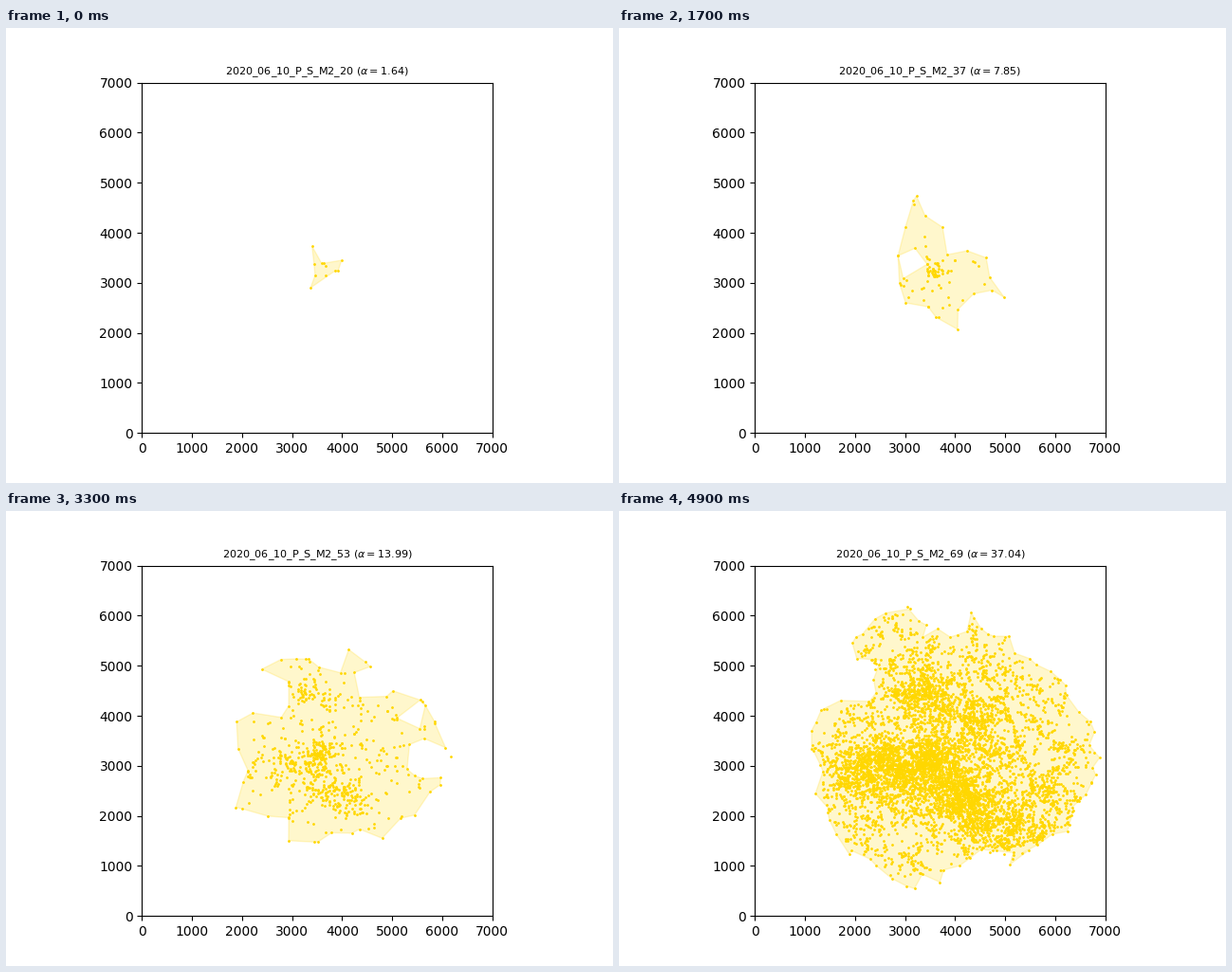
Recreate the animation shown at these times as a matplotlib script. Size 640 by 480 pixels, loop 5 s.

```python
import matplotlib.pyplot as plt
import numpy as np
from matplotlib.animation import FuncAnimation
from matplotlib.collections import LineCollection
from matplotlib.patches import PathPatch
from matplotlib.path import Path
from matplotlib.tri import Triangulation

FRAMES, INTERVAL = 50, 100
FIRST_INDEX = 20
UNIT = 10                      # shapes are written in tens of axis units
CENTRE = np.array([385, 325])
RIM_SPACING = 26
LONGEST_EDGE = 600
CHAIN = np.arange(5)
LOOSE_SHARE = 0.55
rng = np.random.default_rng(7)

# Corner points of the colony; older stages reuse a shape at a larger scale.
SEEDLING = [(340, 373), (344, 337), (346, 315), (337, 290), (386, 324),
            (392, 324), (399, 345), (363, 339), (359, 339)]
SPROUT = [(340, 434), (375, 411), (339, 393), (348, 347), (365, 339),
          (399, 345), (424, 364), (462, 350), (469, 311), (437, 278),
          (388, 301), (346, 315), (337, 266), (346, 252), (388, 256),
          (362, 231), (306, 272), (289, 299), (286, 354), (302, 305),
          (346, 315), (344, 337), (320, 369), (339, 393)]
BRANCHED = [(314, 498), (356, 483), (375, 443), (431, 421), (386, 423),
            (375, 411), (384, 356), (424, 364), (437, 415), (490, 410),
            (522, 341), (504, 338), (498, 271), (439, 231), (405, 207),
            (361, 231), (346, 252), (301, 207), (301, 260), (259, 281),
            (253, 311), (286, 354), (301, 412)]
MATURE = [(311, 591), (340, 536), (390, 536), (428, 580), (458, 542),
          (534, 497), (589, 459), (623, 400), (661, 317), (636, 250),
          (575, 178), (498, 123), (426, 135), (371, 91), (310, 84),
          (244, 133), (183, 178), (145, 252), (138, 366), (191, 421),
          (255, 435), (261, 487), (212, 525), (253, 569)]

# frame, shape, scale, rim roughness, number of points, alpha
STAGES = [(0, SEEDLING, 1, 0, 11, 1.64),
          (12, SPROUT, 1, 0, 60, 7.09),
          (22, BRANCHED, 1, 0, 190, 8.61),
          (27, BRANCHED, 1.09, 4, 420, 11.68),
          (38, MATURE, 0.84, 8, 1350, 15.91),
          (44, MATURE, 1, 4, 3100, 16.74),
          (49, MATURE, 1.1, 12, 6300, 37.04)]
STAGE_FRAMES, _, _, _, TOTALS, ALPHAS = zip(*STAGES)

# x, y and the stage in which a dense spot appears
SPOTS = np.array([(355, 315, 0), (310, 293, 1), (400, 240, 2), (335, 440, 3),
                  (440, 220, 4), (240, 300, 4), (190, 275, 5), (505, 165, 5),
                  (440, 385, 5), (575, 230, 6)])


def outline(shape, scale, roughness):
    """Closed path; a rough rim gets jittered points along its edges."""
    corners = CENTRE + scale * (np.array(shape) - CENTRE)
    rim = []
    for a, b in zip(corners, np.roll(corners, -1, axis=0)):
        pieces = max(1, round(np.hypot(*(b - a)) / RIM_SPACING))
        steps = np.arange(pieces if roughness else 1)[:, None] / pieces
        edge = a + steps * (b - a)
        edge[1:] += rng.normal(0, roughness, edge[1:].shape)
        rim.append(edge)
    rim.append(corners[:1])
    return Path(UNIT * np.vstack(rim), closed=True)


def grow(path, stage, count):
    """Short chains of points inside a path, denser around the spots."""
    size = 8 * count + 50
    active = SPOTS[SPOTS[:, 2] <= stage, :2]
    pick = active[rng.integers(len(active), size=size)]
    dense = UNIT * rng.normal(pick, 5 * (stage + 1))
    loose = rng.uniform(path.vertices.min(0), path.vertices.max(0), (size, 2))
    seeds = np.where(rng.random((size, 1)) < LOOSE_SHARE, loose, dense)
    seeds = seeds[path.contains_points(seeds)][:count // 3 + 2]
    angle = rng.uniform(0, 2 * np.pi, len(seeds))
    heading = np.column_stack([np.cos(angle), np.sin(angle)])
    points = seeds[:, None] + 45 * CHAIN[:, None] * heading[:, None]
    points = (points + rng.normal(0, 12, points.shape)).reshape(-1, 2)
    return rng.permutation(points[path.contains_points(points)])[:count]


def build_colony():
    paths, points, births = [], [], []
    start = total = 0
    for k, (end, shape, scale, roughness, goal, _) in enumerate(STAGES):
        path = outline(shape, scale, roughness)
        rim = np.unique(path.vertices, axis=0)
        inner = grow(path, k, goal - total - len(rim))
        share = np.sqrt(rng.random(len(rim) + len(inner)))
        paths.append(path)
        points += [rim, inner]
        births.append(start + np.ceil((end - start) * share))
        start, total = end, goal
    return paths, np.vstack(points), np.concatenate(births)


PATHS, POINTS, BIRTHS = build_colony()


def hull_between(points, stage):
    """Fill path and rim segments for points between two stages."""
    triangles = Triangulation(*points.T).triangles
    corners = points[triangles]
    centres = corners.mean(axis=1)
    edges = np.linalg.norm(corners - np.roll(corners, 1, axis=1), axis=2)
    keep = PATHS[stage - 1].contains_points(centres)
    keep |= (PATHS[stage].contains_points(centres)
             & (edges.max(axis=1) < LONGEST_EDGE))
    mesh = Triangulation(*points.T, triangles[keep])
    corners = corners[keep]
    loops = np.concatenate([corners, corners[:, :1]], axis=1).reshape(-1, 2)
    codes = [Path.MOVETO, Path.LINETO, Path.LINETO, Path.CLOSEPOLY]
    sides = np.stack([corners, np.roll(corners, -1, axis=1)], axis=2)
    return (Path(loops, np.tile(codes, len(corners))),
            sides[mesh.neighbors == -1])


def hull(frame, points):
    stage = int(np.searchsorted(STAGE_FRAMES, frame))
    if STAGE_FRAMES[stage] == frame:
        return PATHS[stage], [PATHS[stage].vertices]
    return hull_between(points, stage)


fig, ax = plt.subplots(figsize=(6.4, 4.8), dpi=100)
ax.set_aspect("equal")
ax.set_xlim(0, 7000)
ax.set_ylim(0, 7000)
title = ax.set_title("", fontsize=8)
fill = ax.add_patch(PathPatch(PATHS[0], facecolor="gold", lw=0, alpha=0.2))
border = ax.add_collection(
    LineCollection([], colors="gold", linewidths=1, alpha=0.2), autolim=False)
dots, = ax.plot([], [], "o", color="gold", ms=1, mew=1)


def update(frame):
    points = POINTS[BIRTHS <= frame]
    path, segments = hull(frame, points)
    fill.set_path(path)
    border.set_segments(segments)
    dots.set_data(*points.T)
    alpha = np.interp(frame, STAGE_FRAMES, ALPHAS)
    title.set_text(rf"2020_06_10_P_S_M2_{FIRST_INDEX + frame}"
                   rf" ($\alpha={alpha:.2f}$)")
    return fill, border, dots, title


anim = FuncAnimation(fig, update, frames=FRAMES, interval=INTERVAL,
                     repeat=True, repeat_delay=0)
plt.show()
```
